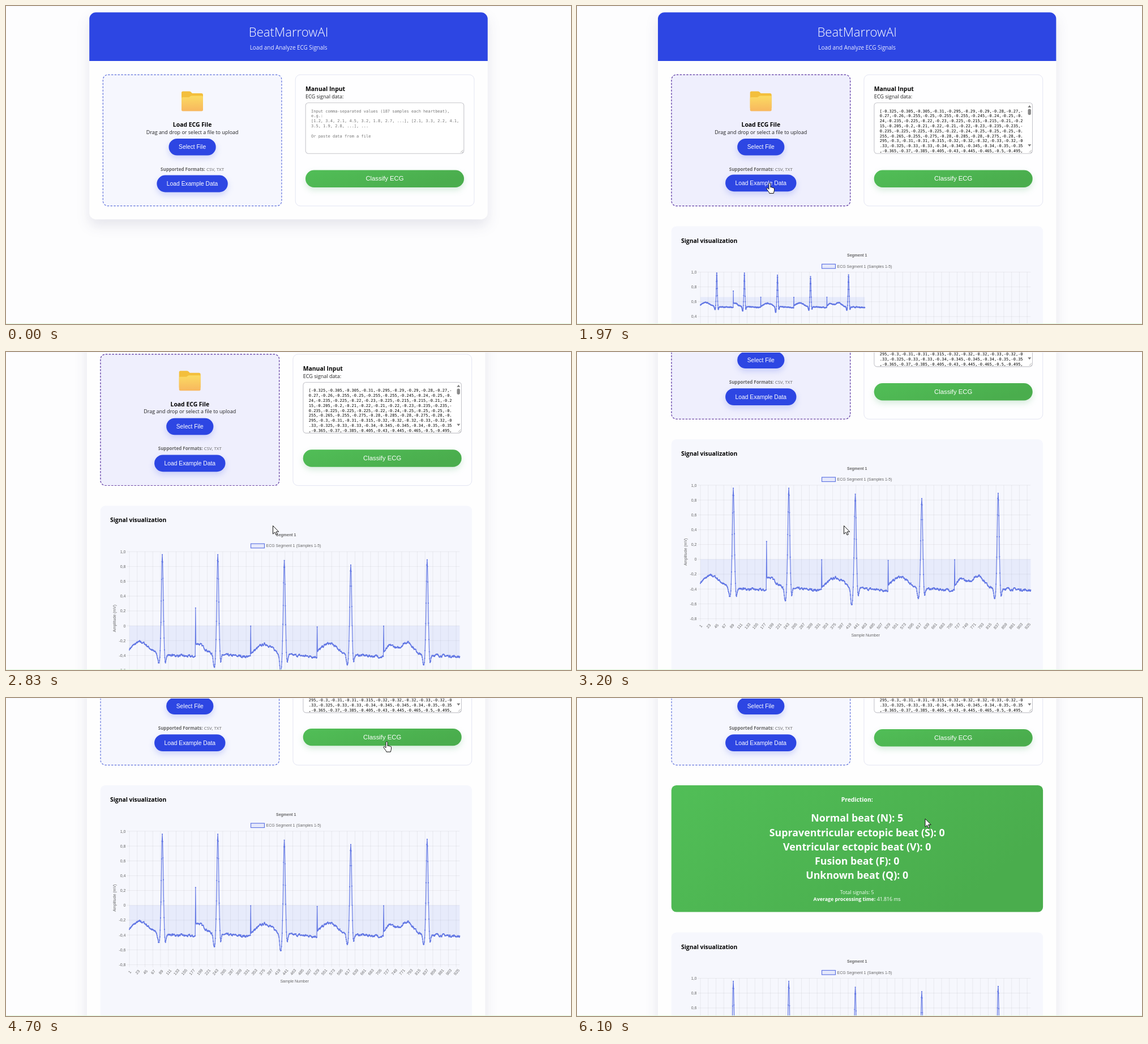
These frames come from a looping animation (998 by 561 pixels, 6.13 s). An HTML page:

```html
<!DOCTYPE html>
<html lang="en">
<head>
<meta charset="utf-8">
<title>ECG classifier demo</title>
<style>
  html, body { margin: 0; width: 100%; height: 100%; overflow: hidden; background: #fdfdfe; }
  svg { display: block; width: 998px; height: 561px; }
  text { font-family: "Open Sans", "Noto Sans", sans-serif; }
  .ui { font-family: "Liberation Sans", Arial, sans-serif; }
  .mono { font-family: "DejaVu Sans Mono", "Noto Sans Mono", monospace; }
  .panel { filter: drop-shadow(0 11px 11px rgba(40, 40, 90, .11)); }
  .blue { filter: drop-shadow(0 5px 5.5px rgba(44, 69, 228, .2)); }
  .green { filter: drop-shadow(0 5px 5.5px rgba(76, 175, 100, .22)); }
  .card { stroke-width: 1.2; stroke-dasharray: 3.5 2.3; }
  .grid { stroke: #000; stroke-opacity: .1; stroke-width: .6; fill: none; }
  .signal path { vector-effect: non-scaling-stroke; fill: none; stroke: #6277e4; stroke-linejoin: round; }
  .signal .area { fill: #667eea; fill-opacity: .1; stroke: none; }
  .cursor { fill: #fff; stroke: #111; stroke-linejoin: round; }
</style>
</head>
<body>
<svg id="stage" viewBox="0 0 998 561"></svg>
<script>
const LOOP = 6130, LOAD = 1870, PREDICT = 5155;
const CX = 499, SECTION_Y = 388.4, PREDICT_GAP = 259.5;
const BLUE = '#2d46e3', GREEN = 'url(#leaf)';
const PLOT = { x: 222.3, y: 81, step: 0.6246, n: 935, unit: 130.8 };
const zeroY = PLOT.y + PLOT.unit, plotW = PLOT.step * (PLOT.n - 1), plotH = PLOT.unit * 1.8;

// Text centred vertically on y
const text = (s, x, y, size, fill = '#000', attrs = '') =>
  `<text x="${x}" y="${(y + size * 0.36).toFixed(2)}" font-size="${size}" fill="${fill}" ${attrs}>${s}</text>`;
const MID = 'text-anchor="middle"', BOLD = 'font-weight="700"', UI = 'class="ui"', MONO = 'class="mono"';
const rect = (x, y, w, h, r, attrs = '') =>
  `<rect x="${x}" y="${y}" width="${w}" height="${h}" rx="${r}" ${attrs}/>`;
const button = (id, label, cx, cy, w, h, size, fill, cls) =>
  `<g id="${id}">${rect(cx - w / 2, cy - h / 2, w, h, h / 2, `fill="${fill}" class="${cls}"`)}
   ${text(label, cx, cy - 0.3, size, '#fff', `${UI} ${MID}`)}</g>`;

let seed = 7;
const random = () => (seed = seed * 16807 % 2147483647) / 2147483647;
const bell = (x, centre, width) => Math.exp(-(((x - centre) / width) ** 2) / 2);

// Each beat: slow humps [centre, width, height], then a sharp peak between two dips
const beats = [
  { start: 0, humps: [[30, 24, .17]], peak: 93, height: .945, dip: -.53 },
  { start: 187, spike: .24, humps: [[192, 20, .15]], peak: 250, height: .965, dip: -.57 },
  { start: 343, spike: 0, humps: [[383, 22, .14]], peak: 438, height: .86, dip: -.645 },
  { start: 531, spike: 0, humps: [[565, 22, .15]], peak: 626, height: .82, dip: -.56 },
  { start: 719, spike: 0, humps: [[739, 13, .12], [785, 17, .17]], peak: 842, height: .885, dip: -.54 }
];
function voltage(i) {
  const b = beats.findLast(b => b.start <= i);
  if (i === b.start && 'spike' in b) return b.spike;
  const rest = -.39 - .0003 * Math.max(0, i - b.peak);
  return rest + b.humps.reduce((sum, [c, w, h]) => sum + h * bell(i, c, w), 0)
    + (b.height + .4) * bell(i, b.peak, 2.7)
    + (b.dip + .4) * bell(i, b.peak - 10, 3) - .12 * bell(i, b.peak + 8, 2);
}
let noise = 0;
const samples = Array.from({ length: PLOT.n }, (_, i) => {
  noise = noise * .6 + (random() - .5) * .025;
  return Math.round((voltage(i) + noise) * 200) / 200;
});
const points = samples.map((v, i) => `${(PLOT.x + i * PLOT.step).toFixed(2)} ${(zeroY - v * PLOT.unit).toFixed(2)}`);
const curve = 'M' + points.join('L');
const dots = points.map(p => `M${p}h.01`).join('');

const placeholder = ['Input comma-separated values (187 samples each heartbeat),', 'e.g.:',
  '[1.2, 3.4, 2.1, 4.5, 3.2, 1.8, 2.7, ...], [2.1, 3.3, 2.2, 4.1,',
  '3.5, 1.9, 2.8, ...], ...', '', 'Or paste data from a file'];
const pasted = `[${samples}`.match(/.{60}/g).slice(0, 9);
const lines = (rows, fill) => rows.map((s, i) => text(s, 539, 185 + i * 8.8, 7, fill, MONO)).join('');

function chart() {
  let grid = '', labels = '';
  const bottom = PLOT.y + plotH, right = PLOT.x + plotW;
  const label = (s, x, y, attrs) => text(s, x, y, 7, '#666', `${UI} ${attrs}`);
  const turned = (s, x, y, angle) => `<g transform="translate(${x} ${y}) rotate(${angle})">${label(s, 0, 0, MID)}</g>`;
  for (let v = 10; v >= -8; v -= 2) {
    const y = PLOT.y + (10 - v) * PLOT.unit / 10;
    grid += `M${PLOT.x - 5} ${y}H${right}`;
    labels += label(v ? (v / 10).toFixed(1).replace('.', ',') : '0', PLOT.x - 6.5, y, 'text-anchor="end"');
  }
  for (let i = 0; i < PLOT.n; i += 22) {
    const x = PLOT.x + i * PLOT.step;
    grid += `M${x} ${PLOT.y}V${bottom + 4.5}`;
    labels += turned(i + 1, x + .6, bottom + 13, -50);
  }
  return `${label('Segment 1', CX, 51.3, `${MID} ${BOLD}`)}
    ${rect(436.8, 67, 24, 7.6, 0, 'fill="#e6e9fb" stroke="#6277e4" stroke-width="1.2"')}
    ${label('ECG Segment 1 (Samples 1-5)', 463.8, 70.6, '')}
    <path class="grid" d="${grid}"/>${labels}
    ${label('Sample Number', PLOT.x + plotW / 2, 345, MID)}
    ${turned('Amplitude (mV)', 195.3, PLOT.y + plotH / 2, -90)}
    <g clip-path="url(#plotClip)"><g id="signal" class="signal">
      <path class="area" d="${curve}V${zeroY}H${PLOT.x}Z"/>
      <path d="${curve}" stroke-width="1.15"/>
      <path d="${dots}" stroke-width="2.1" stroke-linecap="round"/>
    </g></g>`;
}

const results = ['Normal beat (N): 5', 'Supraventricular ectopic beat (S): 0', 'Ventricular ectopic beat (V): 0',
  'Fusion beat (F): 0', 'Unknown beat (Q): 0'];
const card = attrs => rect(171.3, 121.3, 315.6, 231.4, 8.8, `class="card" ${attrs}`);
const leftX = 329.1;

document.getElementById('stage').innerHTML = `
<defs>
  <linearGradient id="leaf" x2="1" y2=".4"><stop stop-color="#51be57"/><stop offset="1" stop-color="#4aad4d"/></linearGradient>
  <linearGradient id="folder" x2="0" y2="1"><stop stop-color="#fbdb62"/><stop offset="1" stop-color="#f8b75e"/></linearGradient>
  <clipPath id="areaClip">${rect(529, 171, 280, 89, 5)}</clipPath>
  <clipPath id="plotClip">${rect(PLOT.x - 1.5, PLOT.y - 1, plotW + 3, plotH + 2, 0)}</clipPath>
  <clipPath id="headClip">${rect(147.2, 11.2, 703.6, 200, 11.7)}</clipPath>
</defs>
<rect width="998" height="561" fill="#fdfdfe"/>
<g id="page">
  ${rect(147.2, 11.2, 703.6, 365.3, 11.7, 'id="panel" class="panel" fill="#fefefe"')}
  ${rect(147, 11, 704, 86, 0, `fill="${BLUE}" clip-path="url(#headClip)"`)}
  ${text('BeatMarrowAI', CX, 46.2, 22.2, '#fff', `${MID} font-weight="300"`)}
  ${text('Load and Analyze ECG Signals', CX, 73, 9.88, '#eef0ff', MID)}

  ${card('fill="#f6f7fe" stroke="#6072dc"')}
  ${card('id="cardHover" fill="#efeffd" stroke="#7048a6"')}
  <path d="M310 153q0-2.500 2.500-2.500h11q2 0 3 1l2.500 2.500h16q3 0 3 3V180H310Z" fill="#f3bf3c"/>
  <path d="M310 163q0-2 2-2h11l4-2.500h19q2 0 2 2V183q0 2.500-2.500 2.500H312.500q-2.500 0-2.500-2.500Z" fill="url(#folder)"/>
  ${text('Load ECG File', leftX, 209, 10.4, '#000', `${MID} ${BOLD}`)}
  ${text('Drag and drop or select a file to upload', leftX, 222.3, 8.98, '#222', MID)}
  ${button('select', 'Select File', leftX, 248.7, 83.2, 29.6, 10.3, BLUE, 'blue')}
  ${text(`<tspan ${BOLD}>Supported Formats:</tspan> CSV, TXT`, leftX, 287.7, 7.98, '#666', MID)}
  ${button('example', 'Load Example Data', leftX, 313.5, 125.4, 29.8, 10.3, BLUE, 'blue')}

  ${rect(511.2, 121.2, 315.8, 231.6, 8.8, 'fill="#fefeff" stroke="#e3e5f2"')}
  ${text('Manual Input', 529, 146.7, 10.4, '#000', BOLD)}
  ${text('ECG signal data:', 529, 160, 9.05, '#222')}
  ${rect(529.2, 170.7, 279.6, 89.6, 5, 'fill="#fff" stroke="#c6c6cc" stroke-width="1.1"')}
  <g clip-path="url(#areaClip)">
    <g id="hint">${lines(placeholder, '#757575')}</g>
    <g id="data">${lines(pasted, '#000')}
      ${rect(800.8, 181.6, 5.4, 10.6, 2.7, 'fill="#8a8a8a"')}
      <path d="M800.600 179h6l-3-4ZM800.600 244h6l-3 4Z" fill="#7d7d7d"/>
    </g>
  </g>
  <path d="M803 258.500l4.500-4.500M805.500 259l2-2" stroke="#888" stroke-width=".7"/>
  ${button('classify', 'Classify ECG', 669, 304.7, 280, 30.4, 11.3, GREEN, 'green')}

  <g id="prediction" transform="translate(0 ${SECTION_Y})">
    ${rect(171, 0, 656.4, 223.6, 8.8, `fill="${GREEN}"`)}
    ${text('Prediction:', CX, 25.2, 10.35, '#fff', `${MID} ${BOLD}`)}
    ${results.map((s, i) => text(s, CX, 58 + i * 25.2, 17.8, '#fff', `${MID} ${BOLD}`)).join('')}
    ${text('Total signals: 5', CX, 188.4, 8.8, '#f4fff4', MID)}
    ${text(`<tspan ${BOLD}>Average processing time:</tspan> 41.816 ms`, CX, 200.8, 8.8, '#fff', MID)}
  </g>
  <g id="section">
    ${rect(171, 0, 656.4, 700, 8.8, 'fill="#f6f7fd"')}
    ${text('Signal visualization', 188.3, 25.5, 10.35, '#000', BOLD)}
    ${chart()}
  </g>
</g>
<rect width="998" height="1" fill="#f6f6fe"/>
<rect y="560" width="998" height="1" fill="#dff8dc"/>
<path id="arrow" class="cursor" d="M0 0V14.500L3.400 11.400 5.600 16.400 7.800 15.400 5.600 10.600H10.200Z"/>
<path id="hand" class="cursor" d="M-1.500 1a1.500 1.500 0 0 1 3 0V7q2-1 2.500.5 2-.8 2.300.6 1.700-.5 1.700 1v3.500c0 2-1.200 3-1.200 5H-.5c0-2-4-5.500-5-8-.4-1.300 1-2 2-1.200l2 2z"/>`;

const el = Object.fromEntries([...document.querySelectorAll('[id]')].map(e => [e.id, e]));
const ramp = (t, start, dur) => Math.min(1, Math.max(0, (t - start) / dur));
const smooth = p => p * p * (3 - 2 * p);
const remaining = p => (1 - p) ** 4;
const pulse = (t, on, off, dur) => smooth(ramp(t, on, dur)) - smooth(ramp(t, off, dur));
const between = (t, a, b) => t >= a && t < b;
const show = (e, on) => e.setAttribute('visibility', on ? 'visible' : 'hidden');
const move = (e, x, y) => e.setAttribute('transform', `translate(${x} ${y})`);

const entry = { x: 300, y: 566 };
const moves = [
  { at: 180, dur: 620, x: 328.5, y: 313.5 },
  { at: 1900, dur: 400, x: 471.5, y: 306.5 },
  { at: 3350, dur: 620, x: 547.5, y: 235 },
  { at: 3970, dur: 430, x: 672.5, y: 77.5 },
  { at: 5350, dur: 500, x: 615, y: 213 }
];
const wheel = [2550, 2670, 2900, 3020];

const cursorAt = t => moves.reduce((c, m) => {
  const p = smooth(ramp(t, m.at, m.dur));
  return { x: c.x + (m.x - c.x) * p, y: c.y + (m.y - c.y) * p };
}, entry);

// First draw grows out of a small canvas; redraw rises from the zero line
function signalTransform(t) {
  if (t >= PREDICT) {
    const grow = Math.max(.001, 1 - remaining(ramp(t, PREDICT, 1000)));
    return `translate(0 ${zeroY}) scale(1 ${grow}) translate(0 ${-zeroY})`;
  }
  const q = remaining(ramp(t, LOAD + 15, 1000));
  return `translate(${PLOT.x} ${PLOT.y}) scale(${1 - .72 * q} ${1 - .95 * q}) translate(${-PLOT.x} ${-PLOT.y})`;
}

function draw(now) {
  const t = now % LOOP, loaded = t >= LOAD, predicted = t >= PREDICT;
  const scroll = wheel.reduce((sum, w) => sum + 58.6 * smooth(ramp(t, w, 120)), 0);
  move(el.page, loaded ? -4.3 : 0, -scroll);
  el.panel.setAttribute('height', loaded ? 1300 : 365.3);
  show(el.hint, !loaded);
  show(el.data, loaded);
  show(el.section, loaded);
  show(el.prediction, predicted);
  move(el.section, 0, SECTION_Y + (predicted ? PREDICT_GAP : 0));
  el.signal.setAttribute('transform', signalTransform(t));

  el.cardHover.setAttribute('opacity', pulse(t, 620, 3400, 180));
  move(el.example, 0, -1.2 * pulse(t, 720, 1960, 120));
  move(el.classify, 0, -1.2 * pulse(t, 4330, 5450, 120));

  const { x, y } = cursorAt(t);
  const pointing = between(t, 720, 1980) || between(t, 4300, 5450);
  show(el.hand, pointing);
  show(el.arrow, !pointing && t >= moves[0].at);
  move(el.hand, x, y);
  move(el.arrow, x, y);
}

const start = performance.now();
function tick() {
  draw(performance.now() - start);
  requestAnimationFrame(tick);
}
tick();
</script>
</body>
</html>
```
